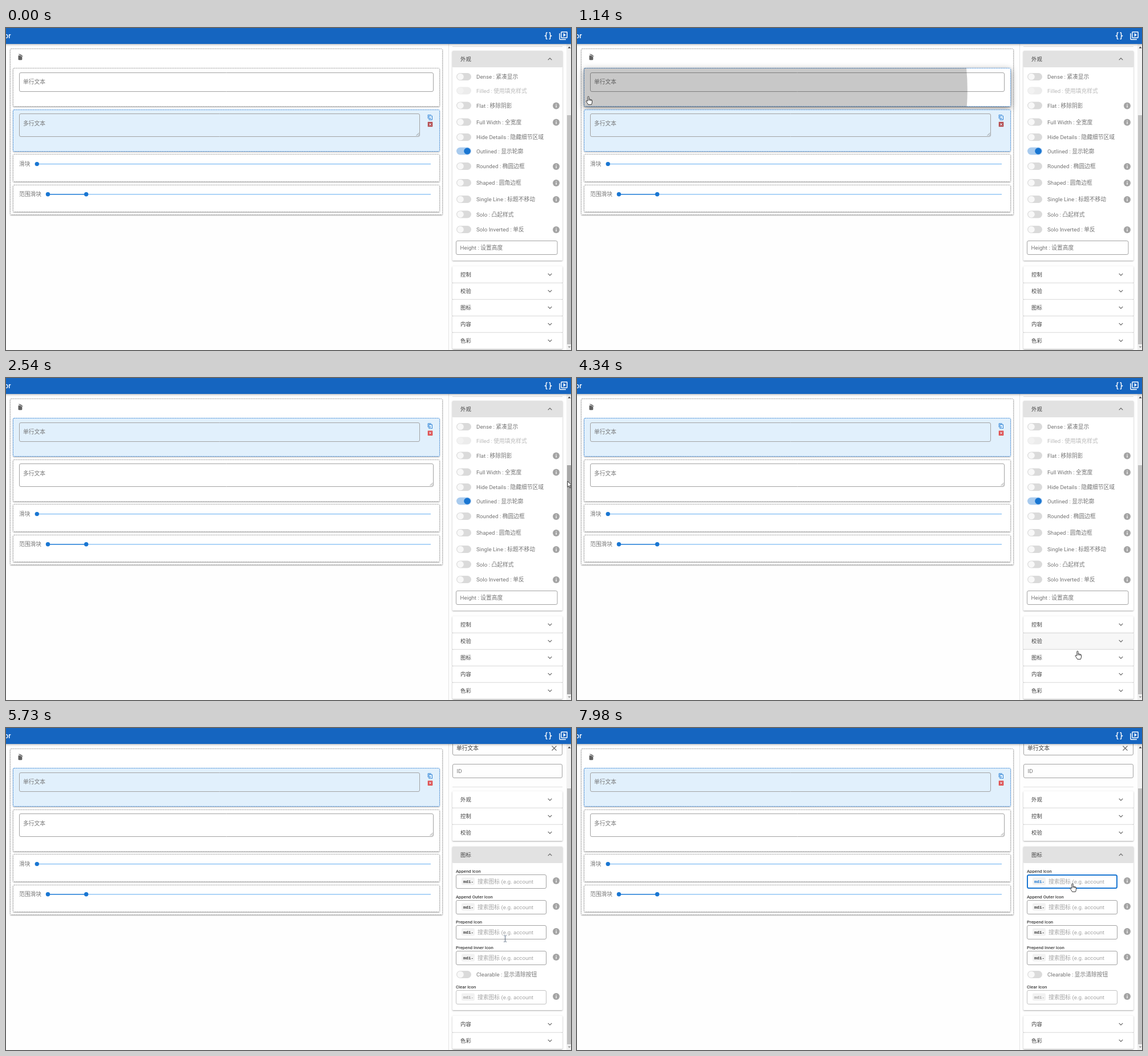
Animation, 991 px wide and 565 px high, one loop 8 s. Source, as an HTML page with a canvas:

```html
<!DOCTYPE html>
<html lang="zh">
<head>
<meta charset="utf-8">
<style>
html, body { margin: 0; width: 100%; height: 100%; overflow: hidden; background: #fff; }
canvas { display: block; }
</style>
</head>
<body>
<canvas id="stage" width="991" height="565"></canvas>
<script>
const c = document.getElementById('stage').getContext('2d');
const FONT = 'Roboto, "Noto Sans CJK SC", "Noto Sans CJK", sans-serif';
const MONO = '"Liberation Mono", monospace';
const BLUE = '#1976d2', LABEL = '#757575', INK = '#404040', LINE = '#a2a2a2';
const LOOP = 8000;

const ICONS = {
  braces: 'M8,3A2,2 0 0,0 6,5V9A2,2 0 0,1 4,11H3V13H4A2,2 0 0,1 6,15V19A2,2 0 0,0 8,21H10V19H8V14A2,2 0 0,0 6,12A2,2 0 0,0 8,10V5H10V3M16,3A2,2 0 0,1 18,5V9A2,2 0 0,0 20,11H21V13H20A2,2 0 0,0 18,15V19A2,2 0 0,1 16,21H14V19H16V14A2,2 0 0,1 18,12A2,2 0 0,1 16,10V5H14V3H16Z',
  play: 'M4,6H2V20A2,2 0 0,0 4,22H18V20H4ZM20,2H8A2,2 0 0,0 6,4V16A2,2 0 0,0 8,18H20A2,2 0 0,0 22,16V4A2,2 0 0,0 20,2M20,4V16H8V4ZM12,14.5V5.5L18,10Z',
  trash: 'M20.37,8.91L19.37,10.64L7.24,3.64L8.24,1.91L11.28,3.66L12.64,3.29L16.97,5.79L17.34,7.16ZM6,19V7H11.07L18,11V19A2,2 0 0,1 16,21H8A2,2 0 0,1 6,19Z',
  copy: 'M11,17H4A2,2 0 0,1 2,15V3A2,2 0 0,1 4,1H16V3H4V15H11V13L15,16L11,19ZM19,21V7H8V13H6V7A2,2 0 0,1 8,5H19A2,2 0 0,1 21,7V21A2,2 0 0,1 19,23H8A2,2 0 0,1 6,21V19H8V21Z',
  remove: 'M3,3H21V21H3ZM17,15.6L13.4,12L17,8.4L15.6,7L12,10.6L8.4,7L7,8.4L10.6,12L7,15.6L8.4,17L12,13.4L15.6,17Z'
};
for (const name in ICONS) ICONS[name] = new Path2D(ICONS[name]);

const ARROW = new Path2D('M0,0V10.4L2.4,8.2L4,12L5.6,11.3L4,7.6H7.3Z');
const HAND = new Path2D('M-1.2,8.4V1.2A1.1,1.1 0 0,1 1,1.2V5.2L1.6,4.6Q2.7,4.5 3,5.4Q4.4,4.9 4.8,6Q6.4,5.7 6.5,7.2V10Q6.4,12 5.4,14.4H-.3Q-1.4,12 -3.8,9.2Q-4.3,7.6 -2.9,7.4Z');
const IBEAM = new Path2D('M-2.5,-5.5H-.8L0,-4.8L.8,-5.5H2.5M0,-4.8V4.8M-2.5,5.5H-.8L0,4.8L.8,5.5H2.5');

// time, x, y, pointer kind
const POINTER = [
  [130, 800, 535, 'arrow'], [590, 20, 120, 'hand'], [1230, 20, 120, 'hand'],
  [1380, 593.5, 170, 'ibeam'], [1480, 755, 190, 'arrow'], [1760, 851, 203, 'arrow'],
  [1850, 851, 203, 'arrow'], [2050, 768, 197, 'arrow'], [2540, 985, 181, 'arrow'],
  [2700, 985, 181, 'arrow'], [3010, 980, 215, 'arrow'], [3160, 980, 215, 'arrow'],
  [3420, 853, 350, 'arrow'], [3630, 878, 452, 'hand'], [4170, 878, 452, 'hand'],
  [4340, 878, 479, 'hand'], [4480, 878, 485, 'hand'], [5570, 878, 484, 'hand'],
  [5650, 877, 425, 'ibeam'], [5730, 875.5, 370, 'ibeam'], [6040, 875.5, 268, 'ibeam'],
  [6190, 875.5, 268, 'ibeam'], [6500, 869, 273, 'hand'], [8000, 869, 273, 'hand']
];

const PANELS = ['外观', '控制', '校验', '图标', '内容', '色彩'];
// label, offset in the panel, has an info badge
const SWITCHES = [
  ['Dense : 紧凑显示', 16.5], ['Filled : 使用填充样式', 41], ['Flat : 移除阴影', 67, 1],
  ['Full Width : 全宽度', 96, 1], ['Hide Details : 隐藏细节区域', 122.5], ['Outlined : 显示轮廓', 147],
  ['Rounded : 椭圆边框', 173.5, 1], ['Shaped : 圆角边框', 202.5, 1],
  ['Single Line : 标题不移动', 231.5, 1], ['Solo : 凸起样式', 258], ['Solo Inverted : 单反', 284.5, 1]
];

const ramp = (t, from, to) => Math.min(1, Math.max(0, (t - from) / (to - from)));
const smooth = u => u * u * (3 - 2 * u);
const black = a => `rgba(0,0,0,${a})`;

function text(s, x, y, color = LABEL, size = 9.75, weight = 400, family = FONT) {
  c.font = `${weight} ${size}px ${family}`;
  c.fillStyle = color;
  c.fillText(s, x, y + size * 0.365);
}

function box(x, y, x2, y2, r, fill, stroke, width = 1) {
  c.beginPath();
  c.roundRect(x, y, x2 - x, y2 - y, r);
  if (fill) { c.fillStyle = fill; c.fill(); }
  if (stroke) { c.strokeStyle = stroke; c.lineWidth = width; c.stroke(); }
}

function disc(x, y, r, fill) {
  c.beginPath();
  c.arc(x, y, r, 0, 7);
  c.fillStyle = fill;
  c.fill();
}

function lines(color, width, ...points) {
  c.beginPath();
  for (let i = 0; i < points.length; i += 2) c.lineTo(points[i], points[i + 1]);
  c.strokeStyle = color;
  c.lineWidth = width;
  c.stroke();
}

function icon(name, x, y, scale, color) {
  c.save();
  c.translate(x - 12 * scale, y - 12 * scale);
  c.scale(scale, scale);
  c.fillStyle = color;
  c.fill(ICONS[name], 'evenodd');
  c.restore();
}

function shadowed(alpha, blur, dy, draw) {
  c.save();
  c.shadowColor = black(alpha);
  c.shadowBlur = blur;
  c.shadowOffsetY = dy;
  draw();
  c.restore();
}

function card(x, y, x2, y2, { fill = '#fff', active, lift = 0 } = {}) {
  if (lift) shadowed(0.42 * lift, 12, 3, () => box(x, y, x2, y2, 2, '#fff'));
  shadowed(0.32, 2, 1, () => box(x, y, x2, y2, 2, '#fff'));
  box(x, y, x2, y2, 2, fill);
  c.setLineDash([1.8, 1.2]);
  box(x + .5, y + .5, x2 - .5, y2 - .5, 2, null, active ? '#3a86d6' : '#9a9a9a');
  c.setLineDash([]);
}

function tools(y, red) {
  icon('copy', 744, y, 0.43, BLUE);
  icon('remove', 744, y + 12.4, 0.47, red);
}

function editor(t) {
  const first = t >= 1230;
  const hover1 = t >= 480 && t < 1290, hover2 = t >= 1330 && t < 1480;
  const blueFill = a => `rgba(225,240,252,${a})`;
  const picked = ramp(t, 1400, 1650);
  const lift1 = ramp(t, 480, 620) * (1 - ramp(t, 1370, 1620));

  card(7, 36, 766, 328);
  icon('trash', 24.9, 51.1, 0.57, '#616161');

  card(12, 70, 761, 138, { fill: blueFill(picked), active: hover1 || t >= 1450, lift: lift1 });
  box(23.5, 78.5, first ? 725.5 : 749.5, 111.5, 2.5, null, LINE);
  text('单行文本', 30, 94.5);
  if (first) tools(84.3, '#e04a4a');
  ripple(t);

  card(12, 143, 761, 217, { fill: blueFill(first ? 0 : 1), active: !first || hover2 });
  const right = first ? 749.5 : 725.5;
  box(23.5, 150.5, right, 190.5, 2.5, null, LINE);
  text('多行文本', 30, 167.5);
  lines('#777', 0.8, right - 6, 189, right - 1, 184);
  lines('#777', 0.8, right - 3, 189, right - 1, 187);
  if (!first) tools(156.7, '#b34548');

  card(12, 221, 761, 270);
  slider('滑块', 238.6, 54.3);

  card(12, 275, 761, 323);
  slider('范围滑块', 291.8, 73.5, 140.7);
}

function slider(label, y, from, to = from) {
  text(label, 23, y);
  lines('#7cbaf3', 1.2, from, y, 745, y);
  lines(BLUE, 1.3, from, y, to, y);
  disc(from, y, 3.7, BLUE);
  if (to > from) disc(to, y, 3.7, BLUE);
}

function ripple(t) {
  if (t < 968 || t > 1520) return;
  const grow = 1 - (1 - ramp(t, 968, 1468)) ** 3;
  const alpha = 0.216 * ramp(t, 960, 1060) * (1 - smooth(ramp(t, 1225, 1480)));
  c.save();
  c.beginPath();
  c.rect(12, 70, 749, 68);
  c.clip();
  disc(20 + 367 * grow, 120 - 16 * grow, 498 * (0.3 + 0.7 * grow), black(alpha));
  c.restore();
}

function toggle(label, y, on, disabled) {
  c.globalAlpha = disabled ? 0.5 : 1;
  box(790, y - 6.5, 816, y + 6.5, 6.5, on ? '#a9cbee' : '#dadada');
  disc(on ? 809 : 797, y, 5.8, on ? BLUE : '#f8f8f8');
  text(label, 825, y);
  c.globalAlpha = 1;
}

function info(y) {
  disc(965, y, 6, '#a4a4a4');
  c.fillStyle = '#fff';
  c.fillRect(964.4, y - 3.2, 1.3, 1.3);
  c.fillRect(964.4, y - .8, 1.3, 4);
}

function appearance(y) {
  SWITCHES.forEach(([label, dy, badge], i) => {
    toggle(label, y + dy, i === 5, i === 1);
    if (badge) info(y + dy + .4);
  });
  box(789.5, y + 304.5, 967, y + 328.5, 2.5, null, LINE);
  text('Height : 设置高度', 796.5, y + 316.5);
}

function iconField(label, y, t, first, disabled) {
  const focus = first && t >= 6800, hover = first && t >= 5990;
  const caret = focus && (t < 6880 || t >= 7430 && t < 7980);
  text(label, 789, y, INK, 7.8, 500);
  if (focus) box(790, y + 7, 947, y + 30, 2.5, null, BLUE, 2);
  else box(789.5, y + 6.5, 947.5, y + 30.5, 2.5, null, hover ? '#333' : disabled ? '#c2c2c2' : LINE);
  box(799, y + 11.5, 822, y + 24.5, 2, '#f2f2f2');
  text('mdi-', 802, y + 18, focus ? BLUE : disabled ? '#aaa' : INK, 7.5, 700, MONO);
  text('搜索图标 (e.g. account', 827, y + 18, '#a4a4a4');
  if (caret) lines('#222', 1, 827.5, y + 13, 827.5, y + 25);
  info(y + 17);
}

function icons(y, t) {
  ['Append Icon', 'Append Outer Icon', 'Prepend Icon', 'Prepend Inner Icon'].forEach((label, i) =>
    iconField(label, y + Math.round(14 + 44.7 * i), t, i === 0));
  toggle('Clearable : 显示清除按钮', y + 195.5);
  iconField('Clear Icon', y + 217, t, false, true);
}

function drawer(t) {
  lines(black(.1), 1, 776.5, 28, 776.5, 565);
  const p = smooth(ramp(t, 5050, 5400));
  const open = [1 - p, 0, 0, p, 0, 0];
  const heights = [339, 0, 0, 258, 0, 0];
  const hover = [0, 0, ramp(t, 3740, 3860) * (1 - ramp(t, 4330, 4480)), ramp(t, 4350, 4600), 0, 0];
  const gaps = open.map((o, i) => i ? 10 * Math.max(o, open[i - 1]) : 0);
  const total = open.reduce((sum, o, i) => sum + 29 + gaps[i] + heights[i] * o, 0);
  let y = 563 - total;

  // content above the panels, scrolled with them
  box(783.5, y - 87.5, 975.5, y - 63.5, 2.5, null, LINE);
  text('单行文本', 790, y - 75.7, INK);
  lines('#666', 1.1, 957.5, y - 79.5, 965.5, y - 71.5);
  lines('#666', 1.1, 965.5, y - 79.5, 957.5, y - 71.5);
  box(783.5, y - 47.5, 975.5, y - 23.5, 2.5, null, LINE);
  text('ID', 790.5, y - 35.7);
  lines(black(.12), 1, 783, y - 7.5, 976, y - 7.5);

  PANELS.forEach((title, i) => {
    y += gaps[i];
    const body = heights[i] * open[i], bottom = y + 29 + body;
    shadowed(.34, 2.5, 1, () => box(783, y, 976, bottom, 1.5, '#fff'));
    if (i) lines(black(.12 * (1 - gaps[i] / 10)), 1, 783, Math.round(y) + .5, 976, Math.round(y) + .5);
    const shade = .035 * hover[i] * (1 - open[i]) + .115 * open[i];
    box(783, y, 976, y + 29, 1.5, black(shade));
    text(title, 797, y + 14.4, INK, 9.4);
    const bend = 1.6 * (1 - 2 * open[i]), mid = y + 14.5;
    lines('#666', 1.2, 950.7, mid - bend, 954, mid + bend, 957.3, mid - bend);
    if (body > 0) {
      c.save();
      c.beginPath();
      c.rect(783, y + 29, 193, body);
      c.clip();
      i ? icons(y + 29, t) : appearance(y + 29);
      c.restore();
    }
    y = bottom;
  });

  const thumb = t >= 2690 && t < 3200 ? '#787878' : t >= 2480 && t < 3240 ? '#a8a8a8' : '#c1c1c1';
  c.fillStyle = '#f1f1f1';
  c.fillRect(983, 28, 8, 537);
  c.fillStyle = thumb;
  c.fillRect(984, 153 - 47 * p, 7, 402 + 47 * p);
  const tip = (y0, d, color) => {
    c.fillStyle = color;
    c.fill(new Path2D(`M985.5,${y0 + d}H990.5L988,${y0 - d}Z`));
  };
  tip(34, 1.4, '#404040');
  tip(560, -1.4, '#9a9a9a');
}

function toolbar() {
  shadowed(.32, 4, 1, () => { c.fillStyle = '#1565c0'; c.fillRect(-9, -9, 1009, 37); });
  c.textAlign = 'right';
  text('or', 8.5, 14, '#fff', 12.2, 500);
  c.textAlign = 'left';
  icon('braces', 951, 13.8, 0.7, '#fff');
  icon('play', 977.6, 13.6, 0.73, '#fff');
}

function pointer(t) {
  const next = POINTER.findIndex(k => k[0] > t);
  if (next < 1) return;
  const [t0, x0, y0, kind] = POINTER[next - 1], [t1, x1, y1] = POINTER[next];
  const u = ramp(t, t0, t1);
  c.save();
  c.translate(x0 + (x1 - x0) * u, y0 + (y1 - y0) * u);
  c.strokeStyle = kind === 'ibeam' ? '#4a5c74' : '#222';
  c.fillStyle = '#fff';
  c.lineWidth = .9;
  c.lineJoin = 'round';
  if (kind === 'ibeam') c.stroke(IBEAM);
  else {
    const shape = kind === 'hand' ? HAND : ARROW;
    c.fill(shape);
    c.stroke(shape);
    if (kind === 'hand') c.stroke(new Path2D('M1,5V7.5M3,5.5V7.7M4.8,6V8'));
  }
  c.restore();
}

function render(now) {
  const t = now % LOOP;
  c.fillStyle = '#fefefe';
  c.fillRect(0, 0, 991, 565);
  editor(t);
  drawer(t);
  toolbar();
  pointer(t);
  requestAnimationFrame(render);
}
requestAnimationFrame(render);
</script>
</body>
</html>
```
